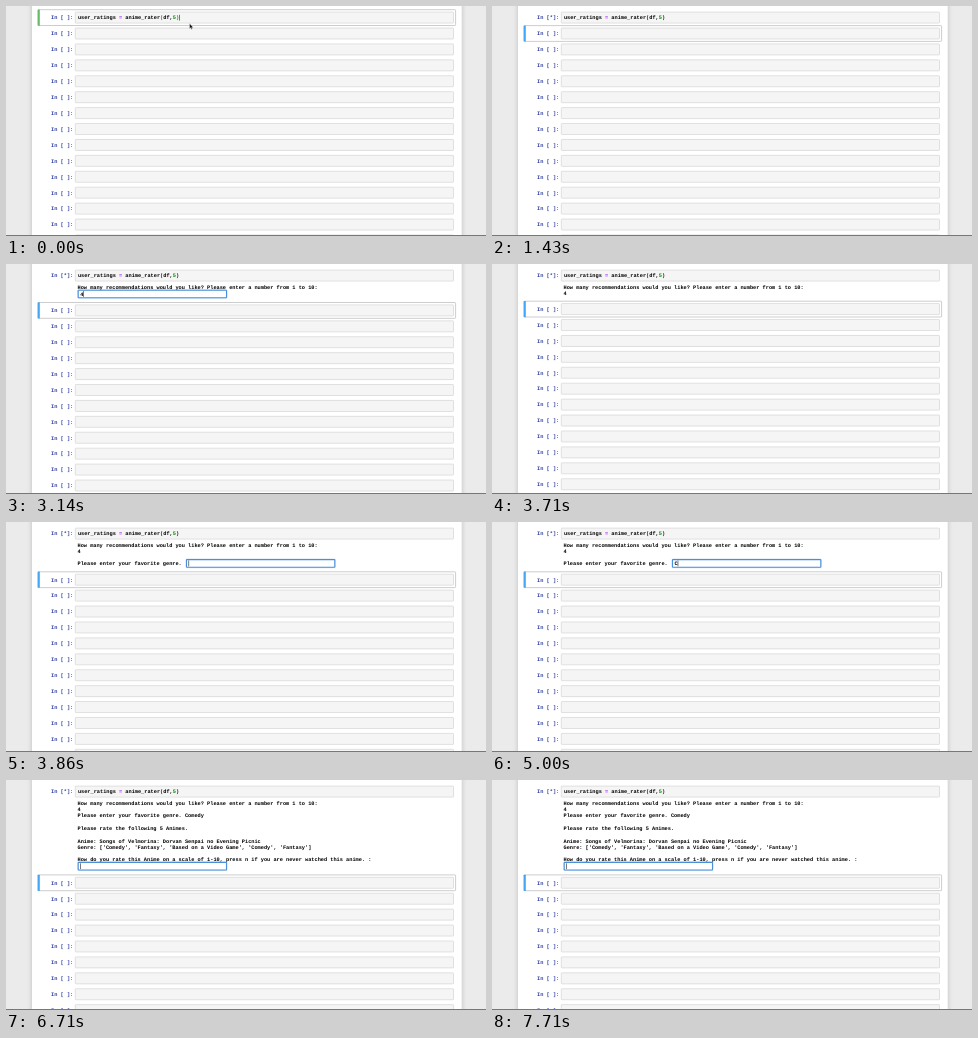
Animation, 480 px wide and 230 px high, one loop 8000 ms. Source, as an HTML page:

```html
<!DOCTYPE html>
<html lang="en">
<head>
<meta charset="utf-8">
<title>Notebook session</title>
<style>
  html, body { margin: 0; width: 100%; height: 100%; overflow: hidden; background: #eee; }
  svg { display: block; width: 100vw; height: 100vh; }
  text {
    font: bold 5.28px "Liberation Mono", "Courier New", monospace;
    white-space: pre;
    text-rendering: geometricPrecision;
  }
  .page { fill: #fff; filter: drop-shadow(0 0 2.5px rgba(87, 87, 87, .3)); }
  .prompt { fill: #303f9f; }
  .area { fill: #f5f5f5; stroke: #cfcfcf; stroke-width: .6; }
  .frame { fill: #fff; stroke: #ababab; stroke-width: .6; }
  .field { fill: #fff; stroke: #4a8fdc; stroke-width: 1.1; }
  .glow { fill: none; stroke: #8dbcf0; stroke-opacity: .4; stroke-width: 2; }
</style>
</head>
<body>
<svg viewBox="0 0 480 230" preserveAspectRatio="none">
  <rect width="480" height="230" fill="#ebebeb"/>
  <rect class="page" x="26" y="-12" width="429.7" height="260"/>
  <g id="selection">
    <rect class="frame" x="32" y="-7.9" width="417.6" height="15.8" rx=".8"/>
    <rect id="bar" x="31.7" y="-8.1" width="2.1" height="16.2" rx=".5"/>
  </g>
  <g id="first"></g>
  <g id="rest"></g>
  <text id="code" x="71.9" y="13.4"></text>
  <g id="output"></g>
  <g id="input">
    <rect class="glow" width="148.3" height="7.6" rx=".8"/>
    <rect class="field" width="148.3" height="7.6" rx=".5"/>
    <text id="typed" x="2" y="5.6"></text>
  </g>
  <rect id="caret" width=".6" height="5.8" fill="#222"/>
  <path id="mouse" d="M0 0V5.2L1.2 4.1L2 5.9L2.8 5.5L2 3.8H3.6Z"
        fill="#111" stroke="#fff" stroke-width=".3" transform="translate(183.6 17.6)"/>
  <rect y="229" width="480" height="1" fill="#777"/>
</svg>
<script>
const LOOP = 8000, PITCH = 15.92, CHAR = 3.168, FIRST_Y = 11.6;
const LEFT = 71.5, LINE = 6.38, BASE = 24.6;
const $ = id => document.getElementById(id);

const ASK_COUNT = "How many recommendations would you like? Please enter a number from 1 to 10:";
const ASK_GENRE = "Please enter your favorite genre. ";
const ASK_RATE = "How do you rate this Anime on a scale of 1-10, press n if you are never watched this anime. :";
const answered = [ASK_COUNT, "4"];
const rating = [
  ...answered, ASK_GENRE + "Comedy", "",
  "Please rate the following 5 Animes.", "",
  "Anime: Songs of Velmorina: Dorvan Senpai no Evening Picnic",
  "Genre: ['Comedy', 'Fantasy', 'Based on a Video Game', 'Comedy', 'Fantasy']"
];

// next: centre of the second cell; ask: [prompt, baseline]; field: input corner
const stages = [
  { at: 0, next: 27.5, lines: [], editing: true },
  { at: 1430, next: 27.5, lines: [] },
  { at: 1570, next: 46.4, lines: [ASK_COUNT], field: [72.2, 26.2] },
  { at: 3570, next: 45.1, lines: answered },
  { at: 3860, next: 57.7, lines: answered, ask: [ASK_GENRE, 43.1], field: [180.5, 37.6] },
  { at: 6430, next: 51.5, lines: rating.slice(0, 3) },
  { at: 6710, next: 102.8, lines: rating, ask: [ASK_RATE, 81], field: [72.2, 82.4] }
];

const caretOn = [[0, 430], [1000, 1430], [1570, 2000], [2430, 3000], [3140, 3570],
  [3860, 4290], [4570, 6000], [6710, 7140], [7710, 8000]];
const COMEDY_KEYS = [5000, 5290, 5430, 5570, 5710, 5860];

const label = (s, x, y, cls = "") => `<text class="${cls}" x="${x}" y="${y}">${s}</text>`;
const cell = (y, mark) => label(`In [${mark}]:`, 45.1, y + 1.8, "prompt") +
  `<rect class="area" x="69.3" y="${y - 5.5}" width="378.2" height="11" rx=".6"/>`;
const show = (el, on) => el.setAttribute("visibility", on ? "visible" : "hidden");
const move = (el, x, y) => el.setAttribute("transform", `translate(${x} ${y})`);

$("rest").innerHTML = Array.from({ length: 14 }, (_, i) => cell(i * PITCH, " ")).join("");

function typedAt(t) {
  if (t < 3860) return t >= 3140 ? "4" : "";
  if (t < 6430) return "Comedy".slice(0, COMEDY_KEYS.filter(k => t >= k).length);
  return "";
}

function setStage({ next, lines, ask, field, editing }) {
  const bracket = editing ? "#0a0" : "#222";
  const span = (s, color) => `<tspan fill="${color}">${s}</tspan>`;
  $("first").innerHTML = cell(FIRST_Y, editing ? " " : "*");
  $("code").innerHTML = "user_ratings " + span("=", "#a2f") + " anime_rater" +
    span("(", bracket) + "df," + span("5", "#080") + span(")", bracket);
  $("bar").setAttribute("fill", editing ? "#66bb6a" : "#42a5f5");
  move($("selection"), 0, editing ? FIRST_Y : next);
  move($("rest"), 0, next);
  $("output").innerHTML = lines.map((s, i) => label(s, LEFT, BASE + i * LINE)).join("") +
    (ask ? label(ask[0], LEFT, ask[1]) : "");
  show($("input"), field);
  if (field) move($("input"), ...field);
}

let current;
function draw(t) {
  const stage = stages.findLast(s => t >= s.at);
  if (stage !== current) setStage(current = stage);
  const typed = typedAt(t);
  $("typed").textContent = typed;
  const [x, y] = stage.field
    ? [stage.field[0] + 2 + typed.length * CHAR, stage.field[1] + .9]
    : [173.3, 8.8];
  move($("caret"), x, y);
  show($("caret"), caretOn.some(([a, b]) => t >= a && t < b));
  show($("mouse"), t < 140);
}

function tick() {
  draw(performance.now() % LOOP);
  requestAnimationFrame(tick);
}
tick();
</script>
</body>
</html>
```
